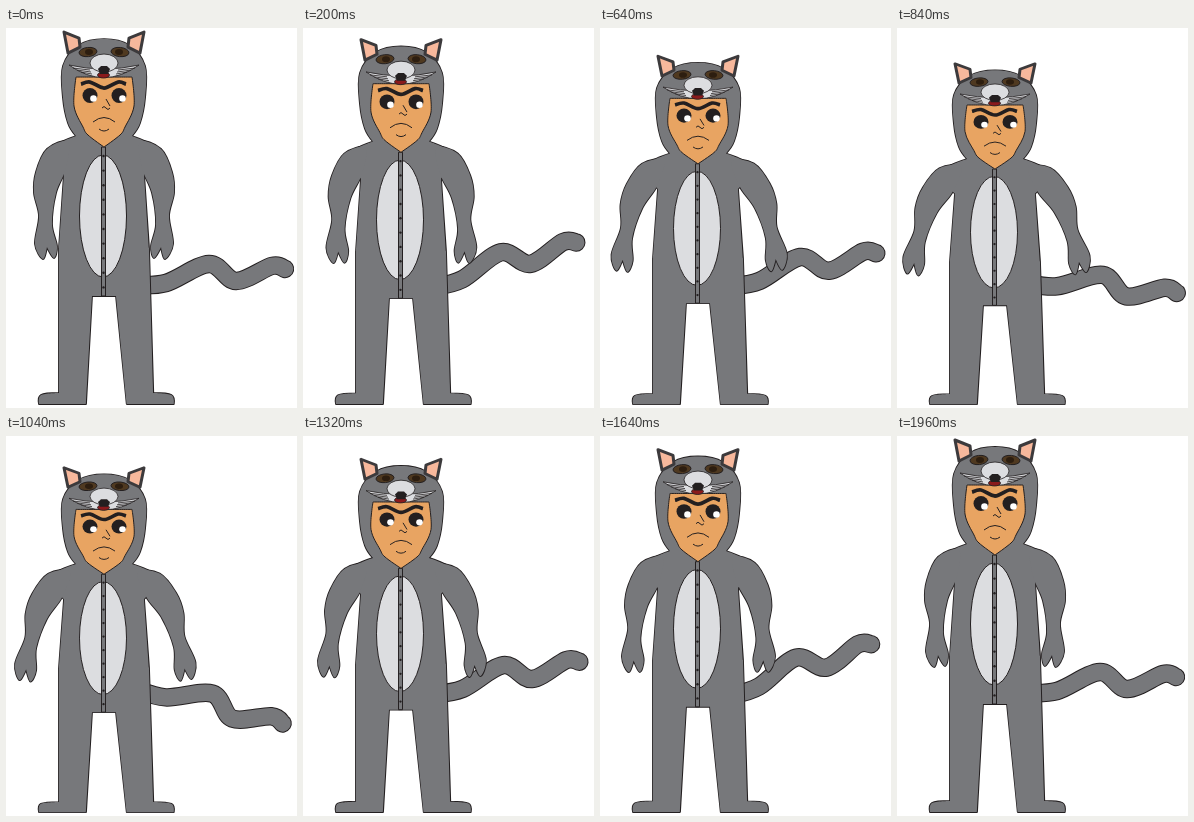
Animation of 291 by 380 pixels, one loop 2 s. Source, as an HTML page with a canvas:

```html
<!DOCTYPE html>
<html>
<head>
<meta charset="utf-8">
<style>
html, body { margin: 0; width: 100%; height: 100%; overflow: hidden; background: #fff }
canvas { display: block; width: 291px; height: 380px }
</style>
</head>
<body>
<canvas></canvas>
<script>
const canvas = document.querySelector('canvas'), ctx = canvas.getContext('2d');
const dpr = window.devicePixelRatio || 1;
canvas.width = 291 * dpr;
canvas.height = 380 * dpr;

const INK = '#231f20', FUR = '#77787b', LIGHT = '#dcdde0', SKIN = '#e8a462', PINK = '#f7b89c';
const FLOOR = 378, MIDDLE = 98;

// "x,y" pairs; "!" marks a sharp corner
const parse = s => s.split(/\s+/).map(w => [...w.replace('!', '').split(',').map(Number), w.endsWith('!')]);

// The right leg leans slightly outward
const flip = ([x, y, sharp]) => [2 * MIDDLE - x + Math.max(0, y - 270) * .045, y, sharp];
const mirror = pts => [...pts, ...pts.slice(1).reverse().map(flip)];

const suit = mirror(parse('98,11 73,17 57,38 57,70 62,95 70,108! 52,116 42,128! 58,146! 53,220! 53,365! 35,367 33,376! 80,376! 86,268!'));
const face = mirror(parse('98,49 70,49! 68,78 77,99 82,107 98,119!'));
const arm = parse('62,114 41,121 30,144 28,165 33,188 29,216 37,231 41,219! 48,230 51,218 46,196 50,165 60,140');
const ear = parse('58,4! 73,10! 74,19! 62,25!');
const tail = parse('128,257 160,255 203,236 230,253 266,238 279,241');
const brow = parse('75,56 84,54 98,60 112,54 120,56');
const nose = parse('92,41! 95,38! 101,38! 104,41! 102,46! 94,46!');

const tailKeys = [[0, 0], [430, -24], [1000, 23], [1480, -21], [1960, 0], [2000, 0]];

function tailAngle(t) {
  const i = tailKeys.findIndex(k => k[0] > t), [t0, a] = tailKeys[i - 1], [t1, b] = tailKeys[i];
  return a + (b - a) * (t - t0) / (t1 - t0);
}

// Smooth curve through the points
function trace(pts, open) {
  const n = pts.length;
  const at = i => pts[open ? Math.max(0, Math.min(n - 1, i)) : (i + n) % n];
  const handle = (i, side) => [0, 1].map(c =>
    at(i)[c] + (at(i)[2] ? 0 : side * (at(i + 1)[c] - at(i - 1)[c]) / 6));
  ctx.beginPath();
  ctx.moveTo(pts[0][0], pts[0][1]);
  for (let i = 0; i < (open ? n - 1 : n); i++) {
    ctx.bezierCurveTo(...handle(i, 1), ...handle(i + 1, -1), at(i + 1)[0], at(i + 1)[1]);
  }
  if (!open) ctx.closePath();
}

function stroke(width = 1, color = INK) {
  ctx.lineWidth = width;
  ctx.strokeStyle = color;
  ctx.stroke();
}

function fill(color) {
  ctx.fillStyle = color;
  ctx.fill();
}

function oval(x, y, rx, ry, color, line, tilt = 0) {
  ctx.beginPath();
  ctx.ellipse(x, y, rx, ry, tilt, 0, 7);
  fill(color);
  if (line) stroke(line);
}

function arc(x0, x1, y, bend) {
  ctx.beginPath();
  ctx.moveTo(x0, y);
  ctx.quadraticCurveTo((x0 + x1) / 2, y + bend, x1, y);
  stroke();
}

function within(change, draw) {
  ctx.save();
  change();
  draw();
  ctx.restore();
}

function turn(x, y, degrees, toY = y) {
  ctx.translate(x, toY);
  ctx.rotate(degrees * Math.PI / 180);
  ctx.translate(-x, -y);
}

function bothSides(draw) {
  draw();
  within(() => { ctx.translate(2 * MIDDLE, 0); ctx.scale(-1, 1); }, draw);
}

function drawTail(t) {
  within(() => turn(141, 257, tailAngle(t)), () => {
    ctx.lineCap = 'round';
    trace(tail, true);
    stroke(18.5);
    stroke(16.5, FUR);
  });
}

// Outlining every part before filling any joins them into one silhouette
function drawSuit(squash, dip) {
  const shoulder = FLOOR - (FLOOR - 125) * squash;
  for (const paint of [() => stroke(1.8), () => fill(FUR)]) {
    within(() => press(squash), () => { trace(suit); paint(); });
    let swing = 15.4;
    bothSides(() => {
      within(() => turn(50, 125, swing * dip, shoulder), () => { trace(arm); paint(); });
      swing = 17.5;
    });
  }
}

function press(squash) {
  ctx.translate(0, FLOOR);
  ctx.scale(1, squash);
  ctx.translate(0, -FLOOR);
}

function drawBelly() {
  oval(97, 188, 23.5, 61, LIGHT, 1);
  ctx.beginPath();
  ctx.rect(95.5, 119, 4, 149);
  fill(FUR);
  stroke();
  for (let y = 128; y < 268; y += 14.6) oval(97.5, y, 1.2, 1.2, INK);
}

function drawFace() {
  trace(face);
  fill(SKIN);
  stroke();
  trace(brow, true);
  stroke(3.8);
  for (const x of [84, 113]) {
    oval(x, 67.5, 7.5, 7.5, INK);
    oval(x + 3.5, 70.5, 3.3, 3.3, '#fff');
  }
  ctx.beginPath();
  ctx.moveTo(100, 71);
  ctx.lineTo(104, 78);
  stroke();
  arc(96, 100, 80, -3);
  arc(100, 104, 80, 3);
  arc(87, 109, 94, -9);
  arc(93, 103, 101, 4);
}

function drawMask() {
  bothSides(() => {
    trace(ear);
    fill(PINK);
    stroke(3, '#3c3a3c');
    oval(82, 24, 9, 4.6, '#4f3920', 1, -.1);
    oval(83, 24, 4, 3, '#2d1e10');
  });
  ctx.beginPath();
  ctx.moveTo(63, 37);
  ctx.quadraticCurveTo(98, 62, 133, 37);
  ctx.quadraticCurveTo(98, 45, 63, 37);
  fill(LIGHT);
  stroke(.8);
  bothSides(() => {
    for (let i = 0; i < 3; i++) {
      ctx.beginPath();
      ctx.moveTo(67 + 4 * i, 40 + 2 * i);
      ctx.lineTo(84 + i, 42 + 2 * i);
      stroke(.8);
    }
  });
  oval(97.5, 47, 6, 3, '#8a1a1c', .8);
  oval(98, 35, 14, 9, LIGHT, .8);
  trace(nose);
  fill(INK);
}

function drawScene(t) {
  const dip = Math.max(0, Math.min(t / 870, (1960 - t) / 1090));
  const squash = 1 - .088 * dip;
  ctx.setTransform(dpr, 0, 0, dpr, 0, 0);
  ctx.lineJoin = 'round';
  ctx.fillStyle = '#fff';
  ctx.fillRect(0, 0, 291, 380);
  drawTail(t);
  drawSuit(squash, dip);
  within(() => press(squash), () => {
    drawBelly();
    drawFace();
    drawMask();
  });
}

const start = performance.now();
function tick() {
  drawScene((performance.now() - start) % 2000);
  requestAnimationFrame(tick);
}
tick();
</script>
</body>
</html>
```
